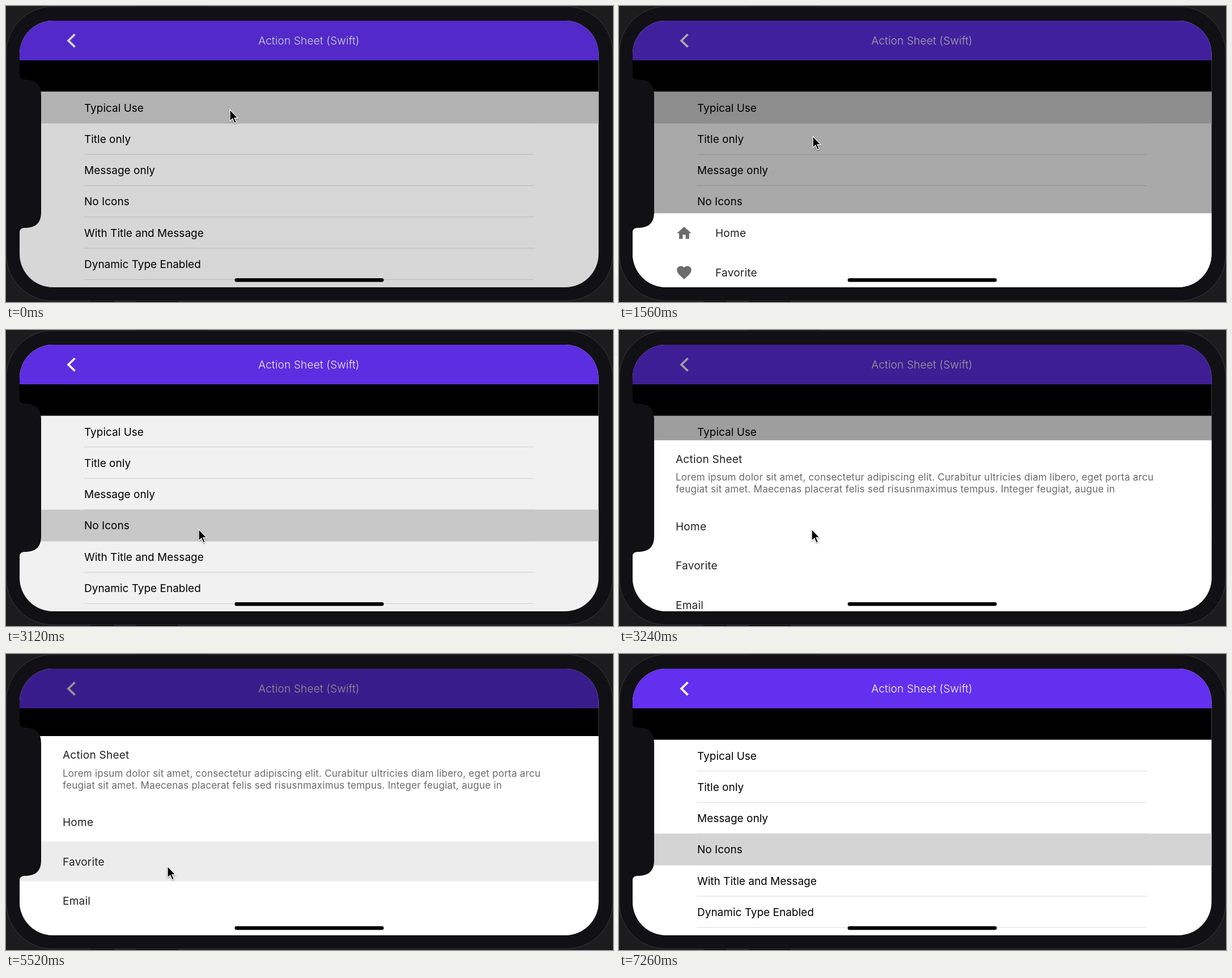
Recreate the animation shown at these times as an HTML page. Size 1071x523 px, loop 7.68 s.

```html
<!DOCTYPE html>
<html lang="en">
<head>
<meta charset="utf-8">
<title>Action sheet demo</title>
<style>
  html, body { margin: 0; width: 100%; height: 100%; overflow: hidden; background: #1c1c1e; }
  svg { display: block; font: 19px Inter, "Open Sans", sans-serif; }
  .title { font-weight: 300; letter-spacing: .2px; fill: #fff; text-anchor: middle; }
  .sheet text { fill: #212121; letter-spacing: .25px; }
  .sheet .body { font-size: 17px; fill: #6a6a6a; letter-spacing: .24px; }
  .sheet path { fill: #6b6b6b; }
</style>
</head>
<body>
<svg width="1071" height="523" viewBox="0 0 1071 523">
  <clipPath id="screen"><rect x="24" y="26" width="1021.5" height="471" rx="59"/></clipPath>

  <path d="M229 0H354V3H229Z M149 520H190V523H149Z M229 520H303V523H229Z"/>
  <rect x=".5" y="1" width="1070" height="520" rx="82" fill="#111015" stroke="#39393c"/>

  <g clip-path="url(#screen)">
    <rect x="24" y="26" width="1022" height="472" fill="#fff"/>
    <rect x="24" y="26" width="1022" height="70.5" fill="#6230ee"/>
    <rect x="24" y="96" width="1022" height="55.5"/>
    <path d="M121.5 50L110 61.2L121.5 72.4" fill="none" stroke="#fff" stroke-width="3.7"/>
    <text class="title" x="534.5" y="68">Action Sheet (Swift)</text>
    <g id="list"></g>
    <rect id="scrim" x="24" y="26" width="1022" height="472"/>

    <g id="icons" class="sheet">
      <rect x="24" width="1022" height="600" fill="#fff"/>
      <path transform="translate(99.7 20) scale(1.27)" d="M10 20v-6h4v6h5v-8h3L12 3 2 12h3v8z"/>
      <path transform="translate(99.7 89.5) scale(1.27)" d="M12 21.35l-1.45-1.32C5.4 15.36 2 12.28 2 8.5 2 5.42 4.42 3 7.5 3c1.74 0 3.41.81 4.5 2.09C13.09 3.81 14.76 3 16.5 3 19.58 3 22 5.42 22 8.5c0 3.78-3.4 6.86-8.55 11.54z"/>
      <path transform="translate(99.7 159) scale(1.27)" d="M20 4H4C2.9 4 2 4.9 2 6v12c0 1.1.9 2 2 2h16c1.1 0 2-.9 2-2V6c0-1.1-.9-2-2-2zm0 4l-8 5-8-5V6l8 5 8-5z"/>
      <text x="170" y="42">Home</text>
      <text x="170" y="111.5">Favorite</text>
      <text x="170" y="181">Email</text>
    </g>

    <g id="plain" class="sheet">
      <rect x="24" width="1022" height="600" fill="#fff"/>
      <rect id="pressed" x="24" y="186.5" width="1022" height="70" fill="#ececec"/>
      <text x="100" y="40">Action Sheet</text>
      <text class="body" x="100" y="71.5">Lorem ipsum dolor sit amet, consectetur adipiscing elit. Curabitur ultricies diam libero, eget porta arcu</text>
      <text class="body" x="100" y="92.5">feugiat sit amet. Maecenas placerat felis sed risusnmaximus tempus. Integer feugiat, augue in</text>
      <text x="100" y="159">Home</text>
      <text x="100" y="228.5">Favorite</text>
      <text x="100" y="298">Email</text>
    </g>

    <rect x="403.5" y="481" width="263" height="6.6" rx="3.3"/>
  </g>

  <path fill="#111015" d="M23 122H24Q24 130 33 130C53 130 62 139 62 158V364C62 383 53 392 33 392Q24 392 24 400H23Z"/>
  <path id="cursor" d="M0 0V20.5L4.7 16.2L8.2 24L11.4 22.6L8 15H14.4Z" stroke="#fff" stroke-width="1.3"
        style="filter:drop-shadow(0 1px 1px #0006)"/>
</svg>

<script>
const LOOP = 7680, STEP = 60, SLIDE = 270, TRAVEL = 525, DIM = .42;
const ROW_TOP = 151.5, ROW_HEIGHT = 55.3;
const $ = id => document.getElementById(id);

const rows = ['Typical Use', 'Title only', 'Message only', 'No Icons', 'With Title and Message', 'Dynamic Type Enabled'];
const rowTop = i => ROW_TOP + i * ROW_HEIGHT;
$('list').innerHTML =
  rows.map((_, i) => `<path d="M138 ${rowTop(i + 1)}H931.5" stroke="#d9d9db"/>`).join('') +
  `<rect id="selected" x="24" width="1022" height="${ROW_HEIGHT + .7}" fill="#d4d4d4"/>` +
  rows.map((label, i) => `<text x="138" y="${rowTop(i) + 35}">${label}</text>`).join('');

const sheets = [
  { node: $('icons'), rest: 262, open: -82, close: 1497 },
  { node: $('plain'), rest: 145, open: 3067, close: 5530 },
];

// Pointer stops: time, x, y
const stops = [
  [0, 395, 183], [540, 383, 198], [1380, 342, 230], [1740, 342, 230], [2340, 336, 368], [2700, 336, 368],
  [2940, 340, 352], [4830, 340, 352], [4980, 318, 329], [5160, 285, 375], [6000, 285, 375], [6840, 300, 526],
];

const clamp = v => Math.min(1, Math.max(0, v));
const smooth = s => s * s * (3 - 2 * s);

// cubic-bezier(.4, 0, .2, 1)
function standardEase(x) {
  let low = 0, high = 1;
  for (let i = 0; i < 24; i++) {
    const s = (low + high) / 2, r = 1 - s;
    if (1.2 * r * r * s + .6 * r * s * s + s ** 3 < x) low = s; else high = s;
  }
  return smooth(low);
}

const slide = (t, start) => standardEase(clamp((t - start) / SLIDE));

function pointerAt(t) {
  const next = stops.findIndex(stop => stop[0] > t);
  if (next < 0) return stops.at(-1).slice(1);
  const [t0, x0, y0] = stops[next - 1], [t1, x1, y1] = stops[next];
  const k = smooth((t - t0) / (t1 - t0));
  return [x0 + (x1 - x0) * k, y0 + (y1 - y0) * k];
}

function draw(t) {
  let shade = 0;
  for (const { node, rest, open, close } of sheets) {
    const shown = slide(t, open) - slide(t, close);
    node.setAttribute('transform', `translate(0 ${rest + TRAVEL * (1 - shown)})`);
    shade += DIM * shown;
  }
  $('scrim').setAttribute('opacity', shade);
  $('selected').setAttribute('y', rowTop(t < 3000 ? 0 : 3));
  $('pressed').setAttribute('opacity', t >= 5400 ? 1 : 0);
  $('cursor').setAttribute('transform', `translate(${pointerAt(t)})`);
}

function tick() {
  draw(Math.floor(performance.now() % LOOP / STEP) * STEP);
  requestAnimationFrame(tick);
}
tick();
</script>
</body>
</html>
```
